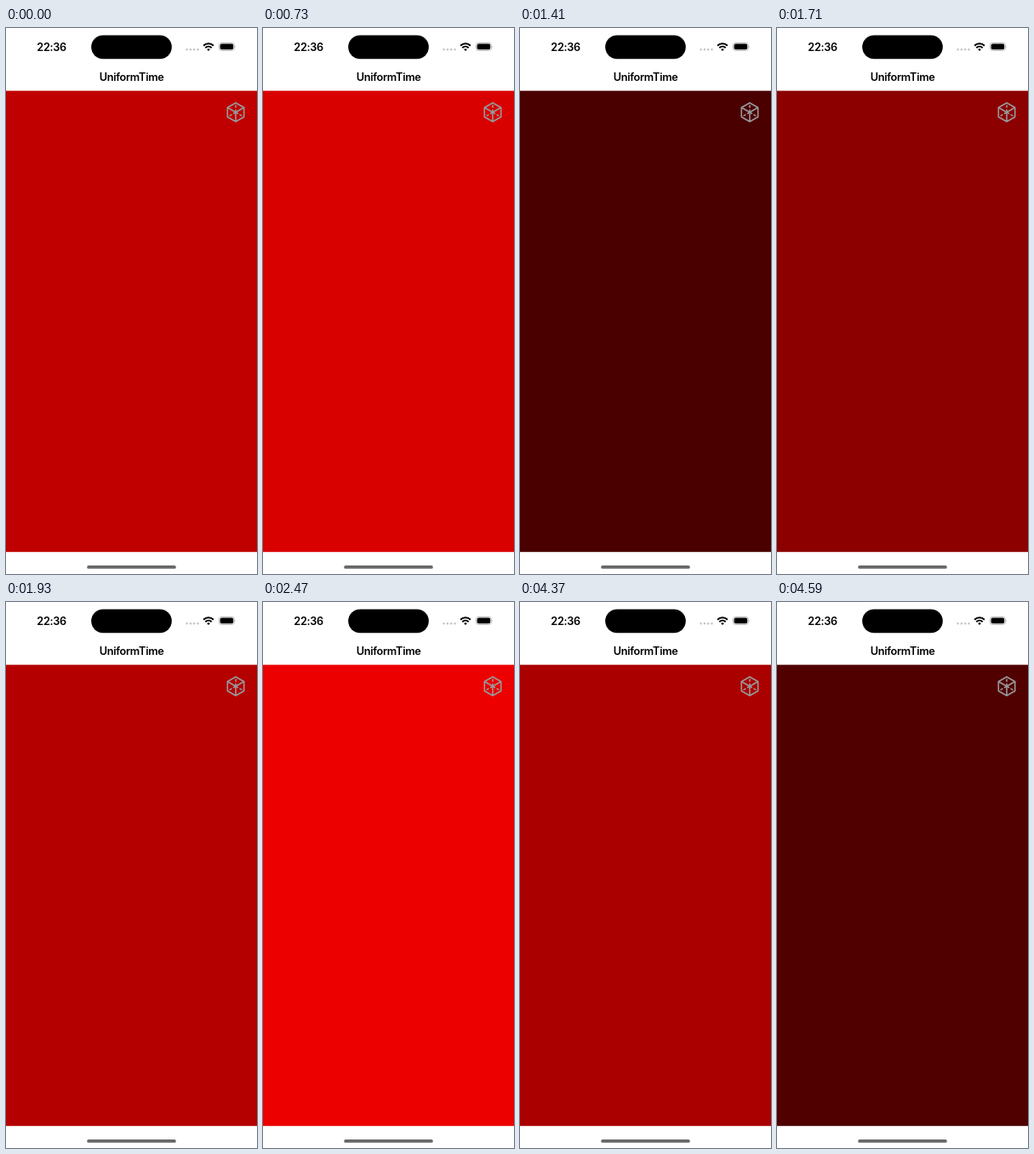
These frames come from a looping animation (295 by 640 pixels, 4.74 s). An HTML page:

```html
<!DOCTYPE html>
<html lang="en">
<head>
<meta charset="utf-8">
<title>UniformTime</title>
<style>
html, body { margin: 0; width: 100%; height: 100%; overflow: hidden; background: #fff; }
svg { display: block; width: 295px; height: 640px; }
text { font: 600 12.7px Inter, sans-serif; letter-spacing: -.3px; text-anchor: middle; }
</style>
</head>
<body>
<svg viewBox="0 0 295 640">
  <text x="53.6" y="26.6">22:36</text>
  <rect x="100.2" y="8.4" width="94.6" height="27.8" rx="13.9"/>
  <path d="M212.6 25.2h13.2" stroke="#c2c2c4" stroke-width="2.5" stroke-linecap="round" stroke-dasharray="0 4.3"/>
  <g fill="none" stroke="#000" stroke-width="2">
    <path d="M232.1 20.7a8.4 8.4 0 0 1 11.8 0M234.3 23.2a5.3 5.3 0 0 1 7.4 0"/>
    <path d="M236.1 24.9q1.9-1.5 3.8 0L238 26.9z" fill="#000" stroke="none"/>
  </g>
  <rect x="250.4" y="17.4" width="18" height="9" rx="2.9" fill="none" stroke="#a6a6a6" stroke-width=".8"/>
  <rect x="251.6" y="18.6" width="15.6" height="6.6" rx="1.9"/>
  <path d="M269.5 20.4q1.3 1.5 0 3z" fill="#a6a6a6"/>
  <text x="147.6" y="61.7">UniformTime</text>

  <rect id="view" y="73.6" width="295" height="540.6" fill="#c00000"/>
  <g transform="translate(270 98.8)" fill="none" stroke="#98999b" stroke-width="1.6" stroke-linejoin="round">
    <path d="M0-11 9.7-5.5V5.5L0 11-9.7 5.5V-5.5zM-9.7-5.5 0 0 9.7-5.5M0 0V11"/>
    <path d="M0 0V-10M0 0-8.7 5M0 0 8.7 5" stroke-dasharray="3.4 1.8"/>
  </g>
  <rect x="95.2" y="630" width="104.6" height="3.8" rx="1.9" fill="#686868"/>
</svg>
<script>
const LOOP = 4740, START = 730, STEP = 107.2;
const view = document.getElementById("view");

// The shader's angle advances steadily with a slight drift
const angle = n => 2.375 + .1075 * n + .065 * Math.sin(n / 6.5);

// Linear light to an 8-bit sRGB channel
function encode(x) {
  const v = x < .0031 ? 12.92 * x : 1.055 * x ** (1 / 2.4) - .055;
  return Math.round(255 * v);
}

function draw() {
  const t = performance.now() % LOOP;
  const n = Math.min(36, Math.floor((t - START) / STEP));
  const red = n < 0 ? 192 : encode(Math.abs(Math.sin(angle(n))));
  view.setAttribute("fill", `rgb(${red},0,0)`);
  requestAnimationFrame(draw);
}
draw();
</script>
</body>
</html>
```
